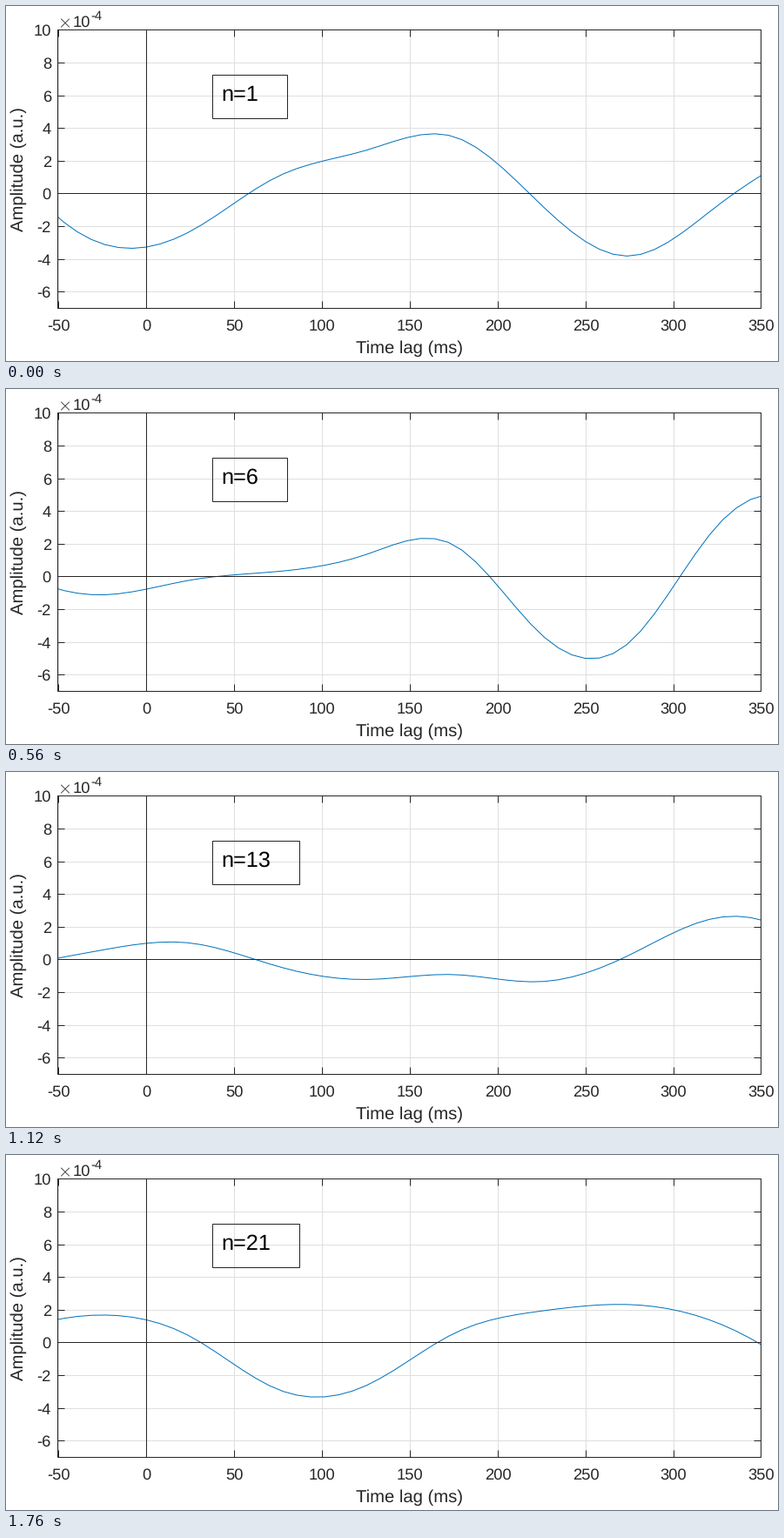
A matplotlib script that plays this animation: 887x408 px, repeating every 1.84 s.

```python
import numpy as np
import matplotlib.pyplot as plt
from matplotlib.animation import FuncAnimation
from matplotlib.patches import Rectangle

W, H, DPI = 887, 408, 64
PX = 72 / DPI                       # points per pixel
INK, GRID, BLUE = "#262626", "#dfdfdf", "#0072bd"
LEFT, RIGHT, TOP, BOTTOM = 59.5, 867.5, 27.5, 347.5
TICK = 8

plt.rcParams["font.family"] = "Liberation Sans"
plt.rcParams["text.hinting"] = "none"

fig = plt.figure(figsize=(W / DPI, H / DPI), dpi=DPI, facecolor="white")
ax = fig.add_axes([0, 0, 1, 1])
ax.set_xlim(0, W)
ax.set_ylim(H, 0)
ax.axis("off")


def to_x(ms):
    return 60 + 2.02 * (ms + 50)


def to_y(amp):
    return 215.9 - 18.8 * amp


def snap(v, lo, hi):
    """Centre of the pixel holding v, kept inside the frame."""
    return np.clip(np.floor(v) + 0.5, lo, hi)


def rule(x0, y0, x1, y1, color=INK, z=2):
    ax.plot([x0, x1], [y0, y1], color=color, lw=PX, zorder=z,
            solid_capstyle="butt", snap=False)


def frame(x, y, w, h, z):
    return ax.add_patch(Rectangle((x, y), w, h, fill=False, ec=INK, lw=PX,
                                  zorder=z, joinstyle="miter", snap=False))


def label(x, y, s, size, ha="center", color=INK, **kw):
    return ax.text(x, y, s, fontsize=size * PX, ha=ha, va="baseline",
                   color=color, **kw)


# Axes, grid and tick labels; the zero lines are dark
for ms in range(-50, 351, 50):
    x = snap(to_x(ms), LEFT, RIGHT)
    rule(x, TOP, x, BOTTOM, GRID if ms else INK, 1 if ms else 4)
    rule(x, TOP, x, TOP + TICK)
    rule(x, BOTTOM, x, BOTTOM - TICK)
    label(to_x(ms), 373, str(ms), 18.4)

for amp in range(-6, 11, 2):
    y = snap(to_y(amp), TOP, BOTTOM)
    rule(LEFT, y, RIGHT, y, GRID if amp else INK, 1 if amp else 4)
    rule(LEFT, y, LEFT + TICK, y)
    rule(RIGHT, y, RIGHT - TICK, y)
    label(52, y + 6.5, str(amp), 18.4, "right")

frame(LEFT, TOP, RIGHT - LEFT, BOTTOM - TOP, 5)
label(464, 399, "Time lag (ms)", 20.2)
label(20, 188, "Amplitude (a.u.)", 20.2, rotation=90,
      rotation_mode="anchor")
for dy in (-4.5, 4.5):
    ax.plot([63.5, 72.5], [19.5 - dy, 19.5 + dy], color=INK, lw=0.8 * PX)
label(76.5, 24, "10", 18.4, "left")
label(97, 16, "-4", 14.7, "left")

# Key poses of the wave by count: one height every 50 ms from -75 ms
START, STEP = -75, 50
POSES = {
    1: [1.6, -3.05, -2.3, 1.07, 2.66, 3.5, -.7, -3.8, -.72, 2.6],
    3: [1.6, -1.95, -1.85, -.06, 2.2, 3.6, -2.1, -3.75, .86, 1.1],
    6: [.4, -1.1, -.2, .33, 1.36, 1.95, -3.55, -4, 3.15, 4.4],
    9: [1.4, -1.35, .1, .93, -.45, .64, -1.95, -2.45, 2.9, 3.1],
    13: [-.4, .6, 1.03, -.4, -1.2, -.9, -1.33, .3, 2.58, 1.1],
    18: [.9, .6, .42, -1.75, -2.17, .9, 1.1, .13, 1.2, .8],
    21: [.65, 1.7, .4, -2.85, -2.62, .57, 1.95, 2.34, 1.22, -2],
}
COUNTS = list(POSES)
HEIGHTS = np.array(list(POSES.values())).T
LAGS = np.arange(-7, 46) * 7.8125   # 128 samples per second


def spline(vals, t):
    """Cubic spline on even knots with parabolic ends."""
    n = len(vals)
    a = 4 * np.eye(n) + np.eye(n, k=1) + np.eye(n, k=-1)
    a[0, :2] = a[-1, -2:] = 1, -1
    rhs = np.zeros(n)
    rhs[1:-1] = np.diff(vals, 2)
    m = np.linalg.solve(a, rhs)
    i = np.clip(np.floor(t).astype(int), 0, n - 2)
    u = t - i
    v = 1 - u
    return (v * vals[i] + u * vals[i + 1]
            + (v**3 - v) * m[i] + (u**3 - u) * m[i + 1])


def wave(n):
    vals = np.array([np.interp(n, COUNTS, row) for row in HEIGHTS])
    swell = 1 + 0.4 * max(0, 1 - abs(n - 7.4) / 1.4)
    return swell * spline(vals, (LAGS - START) / STEP)


curve, = ax.plot([], [], color=BLUE, lw=PX, zorder=3)
curve.set_clip_path(Rectangle((LEFT - .5, TOP), RIGHT - LEFT + 1,
                              BOTTOM - TOP, transform=ax.transData))
box = frame(237.5, 79.5, 86, 50, 6)
count = label(247, 109, "", 25.3, "left", "black", zorder=7)

# Two lead-in counts, then the full run
SEQ = [1, 2, *range(1, 22)]


def draw(i):
    n = SEQ[i]
    curve.set_data(to_x(LAGS), to_y(wave(n)))
    count.set_text(f"n={n}")
    box.set_width(72 + 14 * len(str(n)))
    return curve, box, count


anim = FuncAnimation(fig, draw, frames=len(SEQ), interval=80, repeat=True,
                     repeat_delay=0)
plt.show()
```
